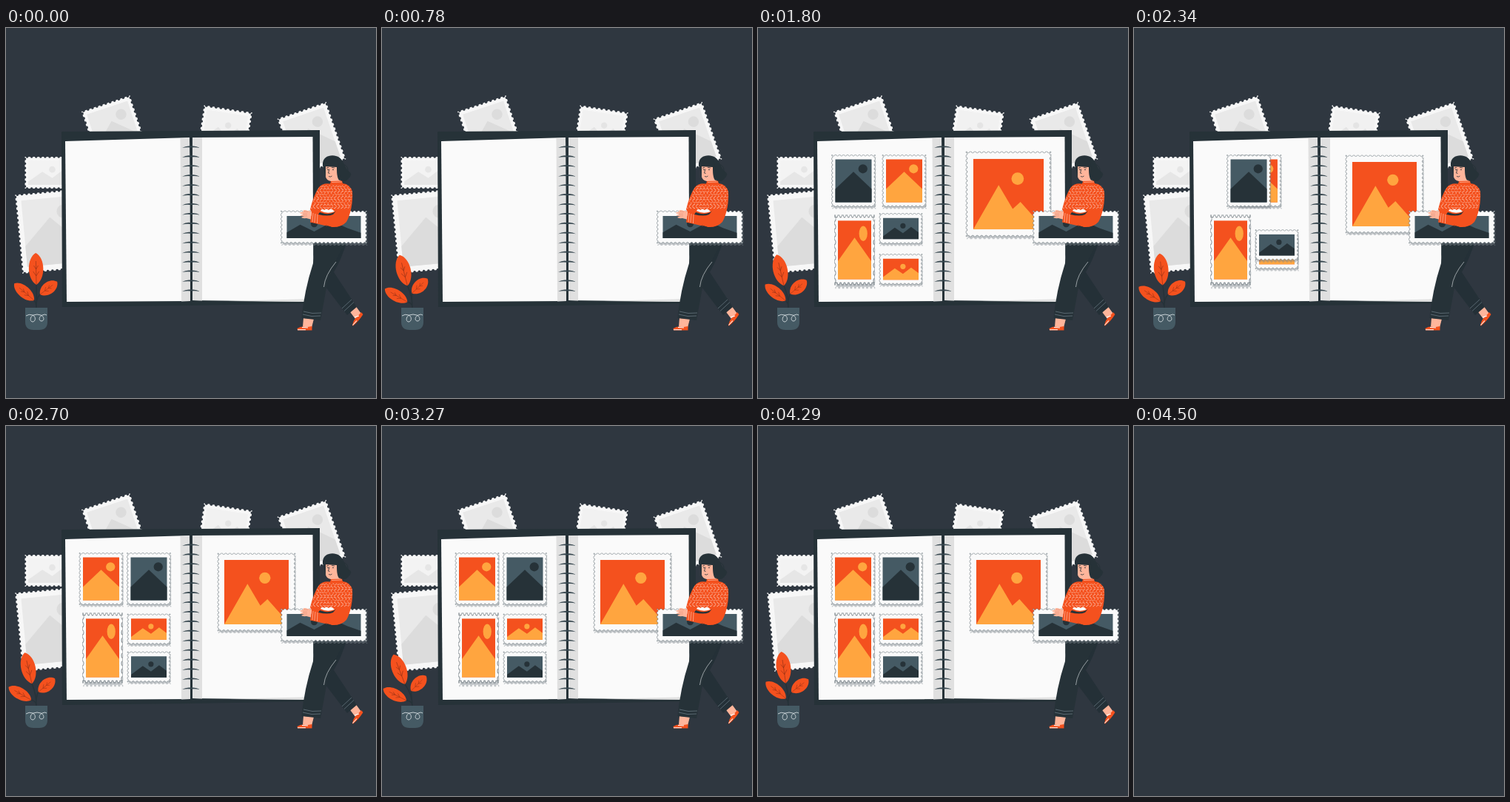
Write an HTML page that moves like this. It is 500 by 500 pixels and loops after 4530 ms.

```html
<!DOCTYPE html>
<html lang="en">
<head>
<meta charset="utf-8">
<title>Stamp album</title>
<style>
  html, body { margin: 0; width: 100%; height: 100%; overflow: hidden; background: #2f3740; }
  svg { display: block; width: 100vw; height: 100vh; }
</style>
</head>
<body>
<svg viewBox="0 0 500 500">
  <defs>
    <path id="blade" d="M0 0C-13-8-13-36 0-43C13-36 13-8 0 0Z" fill="#f4511e"/>
    <path id="vein" d="M0 0L0-32M0-12L-4-18M0-12L4-18M0-21L-3-26M0-21L3-26" fill="none" stroke="#8f2f16" stroke-width=".6"/>
    <clipPath id="knit"><path d="M421 218Q428 209 440 208L457 209Q466 212 468 222Q468 239 461 248L411 246Z"/></clipPath>
  </defs>
  <g id="scene">
    <g id="back"></g>

    <path fill="#263238" d="M75 140L250 139L424 138L424 372L250 375L76 377Z"/>
    <path fill="#fafafa" d="M80 153L248 148L249 369L82 370Z"/>
    <path fill="#fafafa" d="M252 148L414.5 147L415.5 370L252 368Z"/>
    <path fill="#e0e0e0" d="M235.500 149L248 148.500L249 369L237 369.500ZM252 148L265 148L265 368.500L252 368Z"/>
    <path fill="#e0e0e0" d="M300 369L415 366L415.500 370Z"/>
    <g id="rings" fill="#37474f"></g>
    <g id="pages"></g>

    <g id="plant">
      <path id="stem" fill="none" stroke="#263238" stroke-width="1.4"/>
      <g id="leafL"><use href="#blade"/><use href="#vein"/></g>
      <g id="leafR"><use href="#blade"/><use href="#vein"/></g>
      <g id="leafC"><use href="#blade"/><use href="#vein"/></g>
      <path fill="#455a64" d="M26 378H56V397Q56 408 45 408H37Q26 408 26 397Z"/>
      <path fill="none" stroke="#e8eef0" stroke-width=".8" d="M27 389Q31 386 36 388C41 390 40 397 36 397C32 397 32 390 37 388Q42 386 47 388C52 390 52 396 48 396C44 396 44 390 49 388Q53 386 55 388"/>
    </g>

    <g id="legs">
      <path fill="#ffb59b" d="M402 392L416 393L413 405L401 404ZM463 381L472 375L480 386L472 393Z"/>
      <path fill="#f4511e" d="M393.500 406Q401 402 405 404.500L413.500 403V408.500H394ZM468 402Q470 393 474 391L480 384L482.500 387Q477 396 469 402.500Z"/>
      <path fill="none" stroke="#fff" stroke-width="1.1" d="M394 407.800H405M468.500 401.500L474 395.500M400 404.500L408 405M471 391L477 389"/>
      <path fill="#243037" d="M429 290H460Q454 311 443 330L474 377L461 388L429 346Z"/>
      <path fill="#263238" d="M419 290H459Q445 312 434 345L425 395L399.500 392Q403 355 415 318Z"/>
      <path fill="none" stroke="#e4e9eb" stroke-width=".6" d="M446 316Q431 334 429.500 350"/>
      <path fill="none" stroke="#70808a" stroke-width=".7" d="M402 383Q414 387 426 385M401 387Q413 391 425 389M454 379L467 367M457 382.500L470 370.500"/>
    </g>

    <g id="held"></g>

    <g id="body">
      <path fill="#263238" d="M428 186C427 173 439 171 446 173C455 175 456 184 460 190C466 196 467 201 463 203C460 208 450 210 445 206L433 204Z"/>
      <path fill="none" stroke="#263238" d="M456 184Q463 187 462 194Q467 195 465 200M452 205Q460 209 464 201"/>
      <path fill="#ffb59b" d="M432 186L447 185L448 200L454 210H439L439 207Q433 206 432 201Z"/>
      <path fill="#263238" d="M428.500 186Q430 175 441 174Q452 176 451 206Q447 205 447 188L430 187Z"/>
      <path fill="none" stroke="#263238" stroke-width=".8" d="M433 189.300L436 188.500M440 188.500L444 189M437 190.500L435.500 196L437.500 196.500M436 200.500Q438.500 202 440.500 200"/>
      <g fill="#263238"><circle cx="435" cy="191.500" r=".8"/><circle cx="442" cy="191.500" r=".8"/></g>
      <path fill="#f4511e" d="M439 207L454 206.500L455 210Q465 211 468 221C469 235 466 252 460 262Q453 270 440 269L411 262.500L413 249L411 245Q416 225 423 215Q428 209 438 210.500Z"/>
      <path fill="#263238" d="M447 246Q443 252 431 251L424 249L422 252Q435 255 442 252ZM431 266L441 269.200Q450 270 456 266Q448 272 440 270.500Z"/>
      <g id="waves" clip-path="url(#knit)" fill="none" stroke="#fff1ea" stroke-width=".75" opacity=".85"></g>
      <path fill="none" stroke="#ffd6c6" stroke-width=".6" d="M440 208.500L454 208M415 250L414 262M418 251L417 263M421 252L420.500 264"/>
      <path fill="#fafafa" d="M425 247Q427 243 430 246Q433 243 436 246Q439 243 442 246L444 248Q434 252 425 247Z"/>
      <path fill="#ffb59b" d="M413 248L404 246Q400 246 402 248L397 249.500Q397 251 402 251.500L397.500 253Q398 254.500 403 254L399 256Q400 257.500 406 257L412 258.500Z"/>
      <path fill="none" stroke="#d9876d" stroke-width=".5" d="M401 251.500L407 251.300M402 254L407 253.800M402 248L408 248.500"/>
    </g>
  </g>
</svg>
<script>
const LOOP = 4530, BLANK = 4500;
const NS = 'http://www.w3.org/2000/svg';
const $ = id => document.getElementById(id);

function add(parent, tag, attrs) {
  const el = document.createElementNS(NS, tag);
  for (const k in attrs) el.setAttribute(k, attrs[k]);
  return parent.appendChild(el);
}

// Rectangle centred on 0,0 with round bites along its edges.
function perforated(w, h, pitch) {
  let d = `M${-w / 2} ${-h / 2}`;
  for (const [len, ux, uy] of [[w, 1, 0], [h, 0, 1], [w, -1, 0], [h, 0, -1]]) {
    const n = Math.round(len / pitch), step = len / n, bite = step * .58, gap = (step - bite) / 2;
    for (let i = 0; i < n; i++) {
      d += `l${ux * gap} ${uy * gap}a${bite / 2} ${bite / 2} 0 0 0 ${ux * bite} ${uy * bite}l${ux * gap} ${uy * gap}`;
    }
  }
  return d + 'Z';
}

// Art in fractions of the picture: sun [x, y, radius / width] and ridge points.
const ART = {
  single: { sun: [.76, .22, .125], ridge: [[0, .69], [.5, .29], [1, .69]] },
  double: { sun: [.63, .28, .088], ridge: [[0, 1], [.36, .37], [.56, .71], [.67, .61], [1, .98]] },
  low: { sun: [.56, .37, .075], ridge: [[0, .87], [.33, .46], [.56, .72], [.79, .42], [1, .68]] },
  wide: { sun: [.37, .36, .045], ridge: [[0, .74], [.18, .39], [.37, .7], [.62, .25], [.82, .55], [1, .76]] }
};
const FIRE = ['#f4511e', '#ffa53f'], SLATE = ['#455a64', '#263238'];

function stamp(parent, o) {
  const g = add(parent, 'g', { transform: `translate(${o.x} ${o.y}) rotate(${o.rot || 0})` });
  const edge = perforated(o.w, o.h, o.pitch || 5.4);
  if (o.shadow) add(g, 'path', { d: edge, fill: '#7d868c', opacity: .45, transform: 'translate(.8 3)' });
  add(g, 'path', {
    d: edge, fill: o.paper || '#fafafa', stroke: '#37474f',
    'stroke-width': o.shadow ? .6 : 0, 'stroke-opacity': .6
  });
  const { sun, ridge } = ART[o.art], [sky, land] = o.tint;
  const { iw, ih } = o, px = x => (x - .5) * iw, py = y => (y - .5) * ih;
  add(g, 'rect', { x: -iw / 2, y: -ih / 2, width: iw, height: ih, fill: sky });
  add(g, 'circle', { cx: px(sun[0]), cy: py(sun[1]), r: sun[2] * iw, fill: land });
  const pts = [...ridge, [1, 1], [0, 1]].map(([x, y]) => `${px(x)},${py(y)}`);
  add(g, 'polygon', { points: pts.join(' '), fill: land });
  return g;
}

// Stamps tucked behind the album
const grey = ['#e9e9e9', '#dcdcdc'];
const back = (x, y, w, h, rot, iw, ih, art, tint = grey) =>
  stamp($('back'), { x, y, w, h, rot, iw, ih, art, tint, paper: '#f7f7f7', pitch: 6.3 });
back(147, 139, 69, 78, -18.4, 58, 66, 'single');
back(296, 137, 66, 56, 8.6, 56, 45, 'low', ['#f1f1f1', '#e4e4e4']);
back(413, 150, 70, 82, -19, 58, 70, 'single');
back(59, 195.500, 67, 43, 0, 58, 33, 'low', ['#f3f3f3', '#e6e6e6']);
back(61, 274.500, 88, 107, -5.400, 73, 90, 'single');

// Spiral binding
for (let i = 0; i < 16; i++) {
  const y = 160.5 + i * 12.93;
  add($('rings'), 'path', {
    d: `M238 ${y + 1.500}Q243 ${y - 1.500} 248.500 ${y - 1}H251.500Q257 ${y - 1.500} 262 ${y + 1.500}Q256 ${y + .3} 250 ${y + 1}Q244 ${y + .3} 238 ${y + 1.500}Z`
  });
}

// Stamps in the album; the moving ones are placed in draw()
const page = (w, h, iw, ih, art, tint) =>
  stamp($('pages'), { x: 0, y: 0, w, h, iw, ih, art, tint, shadow: true });
const tallFire = page(59, 70, 49, 58, 'single', FIRE);
const tallSlate = page(59, 70, 49, 58, 'single', SLATE);
const long = page(54, 51, 45, 43, 'single', FIRE);
const lowFire = page(58, 41, 48, 28.500, 'low', FIRE);
const lowSlate = page(58, 41, 48, 28.500, 'low', SLATE);
const big = page(105, 105, 87, 87, 'double', FIRE);

stamp($('held'), {
  x: 429.500, y: 269, w: 116, h: 44, iw: 100, ih: 30, art: 'wide', tint: SLATE, shadow: true
});

// Knit pattern
for (let r = 0; r < 9; r++) {
  let d = `M410 ${214 + r * 3.6}`;
  for (let i = 0; i < 14; i++) d += `q1.1 ${r % 2 ? 2.4 : -2.4} 2.2 0t2.2 0`;
  add($('waves'), 'path', { d, 'stroke-dasharray': r % 3 ? '5 2' : '2 1.6' });
}

const clamp = x => Math.min(1, Math.max(0, x));
const ease = (t, a, b) => (1 - Math.cos(Math.PI * clamp((t - a) / (b - a)))) / 2;

// Smooth curve through [time, value] points
function curve(keys, t) {
  let i = 0;
  while (i < keys.length - 2 && t > keys[i + 1][0]) i++;
  const slope = j => {
    const a = keys[Math.max(0, j - 1)], b = keys[Math.min(keys.length - 1, j + 1)];
    return (b[1] - a[1]) / (b[0] - a[0]);
  };
  const [t0, v0] = keys[i], [t1, v1] = keys[i + 1], dt = t1 - t0, u = (t - t0) / dt;
  const s = u * u * (3 - 2 * u);
  return v0 + (v1 - v0) * s + dt * u * (1 - u) * ((1 - u) * slope(i) - u * slope(i + 1));
}

const TOP_SWAY = [[0, 0], [560, .45], [1100, .93], [1380, .87], [1800, .6], [2320, .22],
  [2800, .7], [3270, 1], [4020, .64], [4530, .05]];
const LEFT_SWAY = [[0, 0], [560, .75], [1100, .58], [1380, .45], [1800, .15], [2050, .17],
  [2340, .47], [2700, .78], [3255, 1], [3780, .58], [4020, .28], [4400, 0], [4530, 0]];

const place = (el, x, y, sx, sy = sx) =>
  el.setAttribute('transform', `translate(${x} ${y}) scale(${sx} ${sy})`);

function leaf(id, x, y, angle, sx, sy) {
  $(id).setAttribute('transform', `translate(${x} ${y}) rotate(${angle}) scale(${sx} ${sy})`);
}

function drawPlant(t) {
  const c = curve(TOP_SWAY, t), l = curve(LEFT_SWAY, t);
  const r = (1 - Math.cos(2 * Math.PI * t / (LOOP / 2))) / 2;
  const cx = 41 - 10 * c, cy = 347 + 2 * c;
  const lx = 38 - 5 * l, ly = 368 + 3 * l;
  const rx = 46 - 7 * r, ry = 360 - 2 * r;
  leaf('leafC', cx, cy, -1 - 20 * c, 1, 1);
  leaf('leafL', lx, ly, -49.6 - 13.5 * l, .8, .82);
  leaf('leafR', rx, ry, 53.5 - 8.5 * r, .85, .67);
  $('stem').setAttribute('d',
    `M41 379Q41.500 364 ${cx} ${cy}M41 379Q41 371 ${lx} ${ly}M41 379Q40 366 ${rx} ${ry}`);
}

function drawPages(t) {
  const grow = ease(t, 1080, 1680), swap = ease(t, 2090, 2660);
  place(tallSlate, 129 + 64 * swap, 206.5, grow);
  place(tallFire, 197.5 - 69 * swap, 206.5, grow);
  place(lowSlate, 193 , 271 + 54.5 * swap, grow);
  place(lowFire, 193, 326 - 51.5 * swap, grow);

  const pop = ease(t, 840, 1300), tall = 1 + .84 * ease(t, 1370, 1750);
  place(long, 130.5, 253 + 25.5 * tall, pop, pop * tall);

  place(big, 338.5, 224.5, 1.095 * ease(t, 1080, 1700) - .095 * ease(t, 1760, 2200));
}

function draw(now) {
  const t = now % LOOP;
  $('scene').style.display = t >= BLANK ? 'none' : '';
  drawPlant(t);
  drawPages(t);
}

const start = performance.now();
function tick() {
  draw(performance.now() - start);
  requestAnimationFrame(tick);
}
tick();
</script>
</body>
</html>
```
